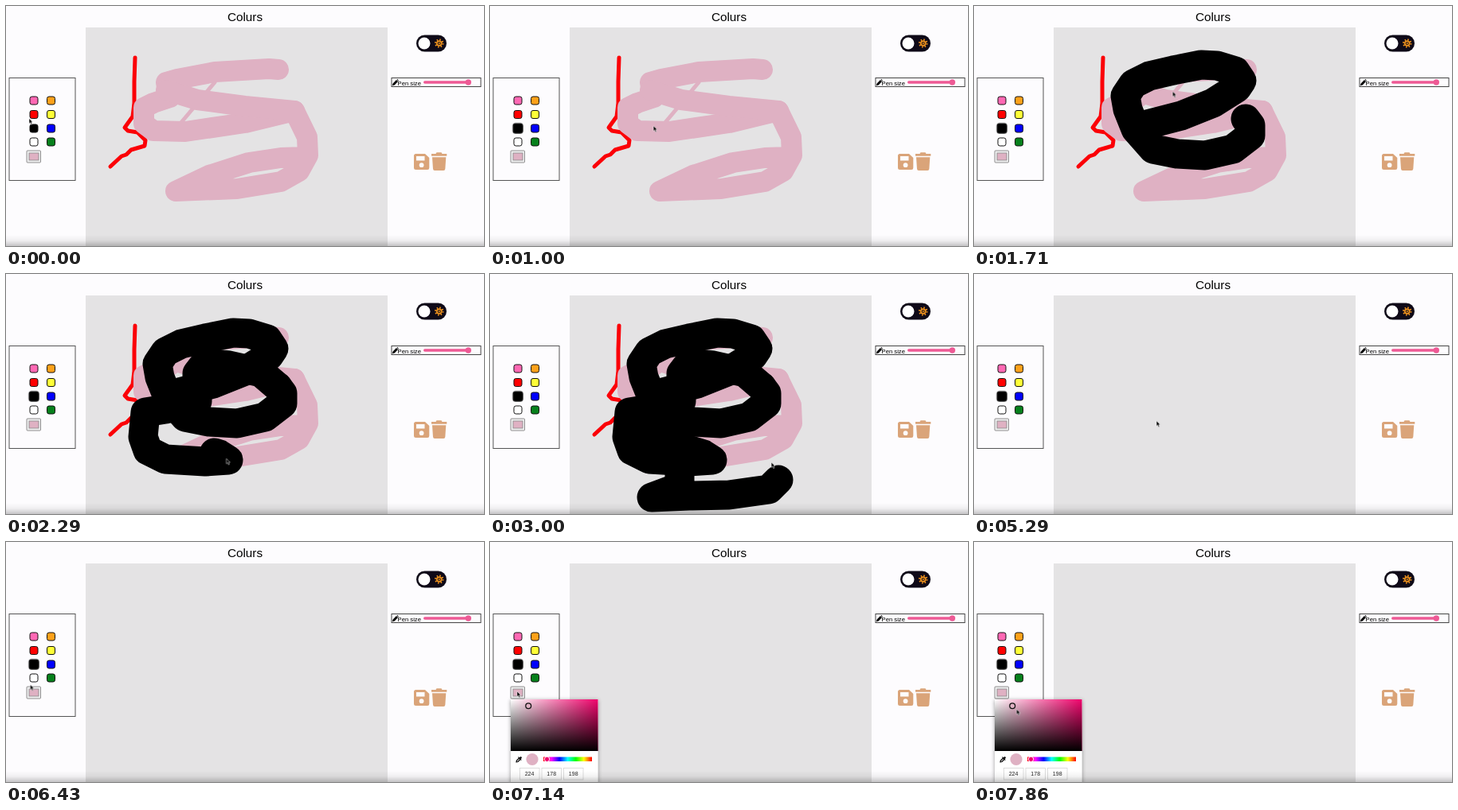
Recreate the animation shown at these times as an HTML page. Size 600 px wide and 302 px high, loop 8000 ms.

```html
<!DOCTYPE html>
<html lang="en">
<head>
<meta charset="utf-8">
<title>Colurs</title>
<style>
  html, body { margin: 0; width: 100%; height: 100%; overflow: hidden; background: #fdfcfe; }
  svg { display: block; width: 100%; height: 100%; font-family: "Liberation Sans", Arial, sans-serif; }
  .line { fill: none; stroke-linecap: round; stroke-linejoin: round; }
  .ink { stroke: #000; stroke-width: 37; stroke-dasharray: 1.01 3; stroke-dashoffset: 1.03; }
  .swatch rect { stroke: #111; stroke-width: 1; }
  .tan { fill: #daa479; }

  .ink, #drawing, #picker, #selected, #cursor { animation: 8s linear infinite; }
  #loop { animation-name: loop; }
  #knot { animation-name: knot; }
  #base { animation-name: base; }
  #drawing { animation-name: clear; }
  #picker { animation-name: open; }
  #selected { animation-name: select; transform-origin: 35px 154px; }
  #cursor { animation-name: move; }

  @keyframes loop { 0%, 12.5% { stroke-dashoffset: 1.03 } 21.37%, 100% { stroke-dashoffset: 0 } }
  @keyframes knot { 0%, 21.4% { stroke-dashoffset: 1.03 } 31.25%, 100% { stroke-dashoffset: 0 } }
  @keyframes base { 0%, 31.25% { stroke-dashoffset: 1.03 } 37.4%, 100% { stroke-dashoffset: 0 } }
  @keyframes clear { 0%, 46.4% { visibility: visible } 46.41%, 100% { visibility: hidden } }
  @keyframes open { 0%, 89.2% { visibility: hidden } 89.21%, 100% { visibility: visible } }
  @keyframes select { 0%, 5.3% { transform: scale(1) } 5.31%, 100% { transform: scale(1.2) } }
  @keyframes move {
    0%, 1.5% { transform: translate(29px, 141.5px) }
    3.5%, 6.5% { transform: translate(33px, 152px) }
    9.5% { transform: translate(120px, 158px) }
    12.5% { transform: translate(204.5px, 151px) }
    14.2% { transform: translate(300px, 121px) }
    15.2% { transform: translate(335px, 93px) }
    16.8% { transform: translate(250px, 80px) }
    17.9% { transform: translate(190px, 113px) }
    19% { transform: translate(225px, 179px) }
    19.9% { transform: translate(300px, 185px) }
    20.6% { transform: translate(341px, 142px) }
    21.37% { transform: translate(249.5px, 107px) }
    23.2% { transform: translate(238px, 160px) }
    25% { transform: translate(172px, 190px) }
    26.8% { transform: translate(210px, 234px) }
    28.6% { transform: translate(278px, 233px) }
    30.4% { transform: translate(210px, 200px) }
    31.5% { transform: translate(237px, 264px) }
    32.6% { transform: translate(203px, 279px) }
    35.6% { transform: translate(300px, 276px) }
    37.5% { transform: translate(352.5px, 237px) }
    41% { transform: translate(535px, 205px) }
    42.8% { transform: translate(560px, 192px) }
    45%, 58.9% { transform: translate(546.5px, 199px) }
    65% { transform: translate(280px, 185px) }
    70.5% { transform: translate(34px, 184px) }
    76%, 81% { transform: translate(30.5px, 179.5px) }
    87%, 90% { transform: translate(34px, 188px) }
    96%, 100% { transform: translate(53.5px, 210.5px) }
  }
</style>
</head>
<body>
<svg viewBox="0 0 600 302" preserveAspectRatio="none">
  <defs>
    <linearGradient id="dock" x2="0" y2="1">
      <stop stop-color="#000" stop-opacity="0"/>
      <stop offset=".5" stop-color="#000" stop-opacity=".05"/>
      <stop offset="1" stop-color="#000" stop-opacity=".22"/>
    </linearGradient>
    <linearGradient id="tint">
      <stop stop-color="#fff"/><stop offset="1" stop-color="#f0046c"/>
    </linearGradient>
    <linearGradient id="shade" x2="0" y2="1">
      <stop stop-color="#000" stop-opacity="0"/><stop offset="1" stop-color="#000"/>
    </linearGradient>
    <linearGradient id="hues">
      <stop stop-color="#f00"/><stop offset=".167" stop-color="#f0f"/>
      <stop offset=".333" stop-color="#00f"/><stop offset=".5" stop-color="#0ff"/>
      <stop offset=".667" stop-color="#0f0"/><stop offset=".833" stop-color="#ff0"/>
      <stop offset="1" stop-color="#f00"/>
    </linearGradient>
    <filter id="shadow" x="-20%" y="-20%" width="140%" height="140%">
      <feDropShadow dx="0" dy="1" stdDeviation="2.5" flood-opacity=".4"/>
    </filter>
  </defs>

  <rect width="600" height="302" fill="#fdfcfe"/>
  <text x="300" y="19" font-size="15.3" text-anchor="middle">Colurs</text>
  <rect x="100" y="27" width="379" height="275" fill="#e4e3e4"/>

  <g id="drawing">
    <path class="line" stroke="#fb0007" stroke-width="5" d="M162 65 161 95 161 122 159 139 149 153 153 157 165 159 175 169 174 176 157 181 151 187 145 189 131 202"/>
    <path class="line" stroke="#dfb1c3" stroke-width="5" d="M262 96 238 125 217 150"/>
    <path class="line" stroke="#dfb1c3" stroke-width="26" d="M342 80 330 79 262 83 215 92 201 96 203 108 206 115 185 122 173 128 173 148 185 157 225 158 300 147 345 136 362 132"/>
    <path class="line" stroke="#dfb1c3" stroke-width="26" d="M201 106 240 118 300 126 362 132 378 165 379 188 368 208 345 221 290 230 213 233 255 213 305 197 345 191 374 190"/>
    <path class="line ink" id="loop" pathLength="1" d="M206 152 260 138 300 122 330 103 336 94 328 82 305 75 285 74 250 81 220 88 200 98 190 113 193 130 203 155 225 180 255 186 290 188 325 180 347 163 347 150 341 142"/>
    <path class="line ink" id="knot" pathLength="1" d="M341 142 320 124 280 115 250 112 240 125 240 160 200 170 175 174 172 205 178 222 200 233 250 236 279 234 268 227 230 215 200 190 225 230 238 245"/>
    <path class="line ink" id="base" pathLength="1" d="M238 245 238 268 203 281 250 279 300 278 350 271 362 259"/>
  </g>

  <!-- palette -->
  <rect x="4" y="90.5" width="83" height="129" fill="none" stroke="#555"/>
  <g class="swatch">
    <rect x="30" y="114" width="10" height="10" rx="2.5" fill="#ff69b4"/>
    <rect x="51.5" y="114" width="10" height="10" rx="2.5" fill="#ffa11a"/>
    <rect x="30" y="131.5" width="10" height="10" rx="2.5" fill="#f00"/>
    <rect x="51.5" y="131.5" width="10" height="10" rx="2.5" fill="#ffff37"/>
    <rect id="selected" x="30" y="149" width="10" height="10" rx="2.5"/>
    <rect x="51.5" y="149" width="10" height="10" rx="2.5" fill="#00f"/>
    <rect x="30" y="166" width="10" height="10" rx="2.5" fill="#fff"/>
    <rect x="51.5" y="166" width="10" height="10" rx="2.5" fill="#07801c"/>
  </g>
  <rect x="26" y="182" width="17.5" height="15" rx="1" fill="#efeff0" stroke="#858585" stroke-width=".9"/>
  <rect x="29" y="185" width="12" height="9" fill="#dfb1c3" stroke="#888" stroke-width=".8"/>

  <!-- theme toggle -->
  <rect x="515" y="36.5" width="38" height="21" rx="10.5" fill="#0f0a18"/>
  <circle cx="525" cy="47" r="7.5" fill="#fff"/>
  <g fill="none" stroke="#f5961d">
    <circle cx="543.7" cy="47" r="2.9" stroke-width="1.6"/>
    <circle cx="543.7" cy="47" r="4.7" stroke-width="2" stroke-dasharray="1.5 2.191"/>
    <circle cx="543.7" cy="47" r=".8" stroke-width="1"/>
  </g>

  <!-- pen size -->
  <rect x="484" y="90.5" width="112" height="11" fill="none" stroke="#444"/>
  <path d="M485 100.2 485.6 97.4 490 93 492 95 487.7 99.5zM490.5 92.5 491.3 92 492.8 93.6 492.4 94.5z"/>
  <text x="491.5" y="99.6" font-size="7.7">Pen size</text>
  <rect x="524" y="94.2" width="59" height="3.5" rx="1.75" fill="#ee5a95"/>
  <circle cx="580.3" cy="96" r="3.7" fill="#ee5a95"/>

  <!-- save and delete -->
  <path class="tan" fill-rule="evenodd" d="M514.5 186H526L531.3 191V203.5Q531.3 206 529 206H514.5Q512 206 512 203.5V188.500Q512 186 514.500 186zM515 189V194.500H525.500V189zM518.700 200.200a2.900 2.900 0 1 0 5.800 0a2.900 2.900 0 1 0 -5.800 0z"/>
  <path class="tan" d="M534 186H539.500L540.500 184.300H546.500L547.500 186H553.300V188.700H534zM535 190.200H552.300L551.300 205Q551.200 207 549.200 207H538Q536.200 207 536 205z"/>

  <g id="picker">
    <rect x="26" y="198" width="109.5" height="112" fill="#fff" filter="url(#shadow)"/>
    <rect x="26" y="198" width="109.500" height="65" fill="url(#tint)"/>
    <rect x="26" y="198" width="109.500" height="65" fill="url(#shade)"/>
    <circle cx="48.200" cy="206.300" r="3.400" fill="#dfb1c3" stroke="#111" stroke-width="1.300"/>
    <path class="line" stroke="#111" stroke-width="1.200" d="M33 277 33.500 275 36.500 272 38 273.500 35 276.500zM35.800 271 39 274.200"/>
    <path class="line" stroke="#111" stroke-width="2.600" d="M37.600 272.400 38.600 271.400"/>
    <circle cx="53" cy="273.500" r="7.600" fill="#dfb1c3"/>
    <rect x="67" y="270.500" width="61" height="5.500" fill="url(#hues)"/>
    <circle cx="71.500" cy="273.300" r="3.200" fill="#f0046c" stroke="#fff" stroke-width="1"/>
    <g fill="#fff" stroke="#d5d5d5" stroke-width=".8">
      <rect x="37.500" y="284.500" width="24.500" height="14.500"/>
      <rect x="65" y="284.500" width="24.500" height="14.500"/>
      <rect x="92.500" y="284.500" width="24.500" height="14.500"/>
    </g>
    <g font-size="7" text-anchor="middle" fill="#222">
      <text x="49.500" y="294.300">224</text>
      <text x="77.200" y="294.300">178</text>
      <text x="104.700" y="294.300">198</text>
    </g>
  </g>

  <rect y="288" width="600" height="14" fill="url(#dock)"/>
  <path id="cursor" d="M0 0V6.500L1.500 5.200 2.600 7.700 3.800 7.200 2.700 4.700H4.700z" stroke="#fff" stroke-width=".5"/>
</svg>
</body>
</html>
```
